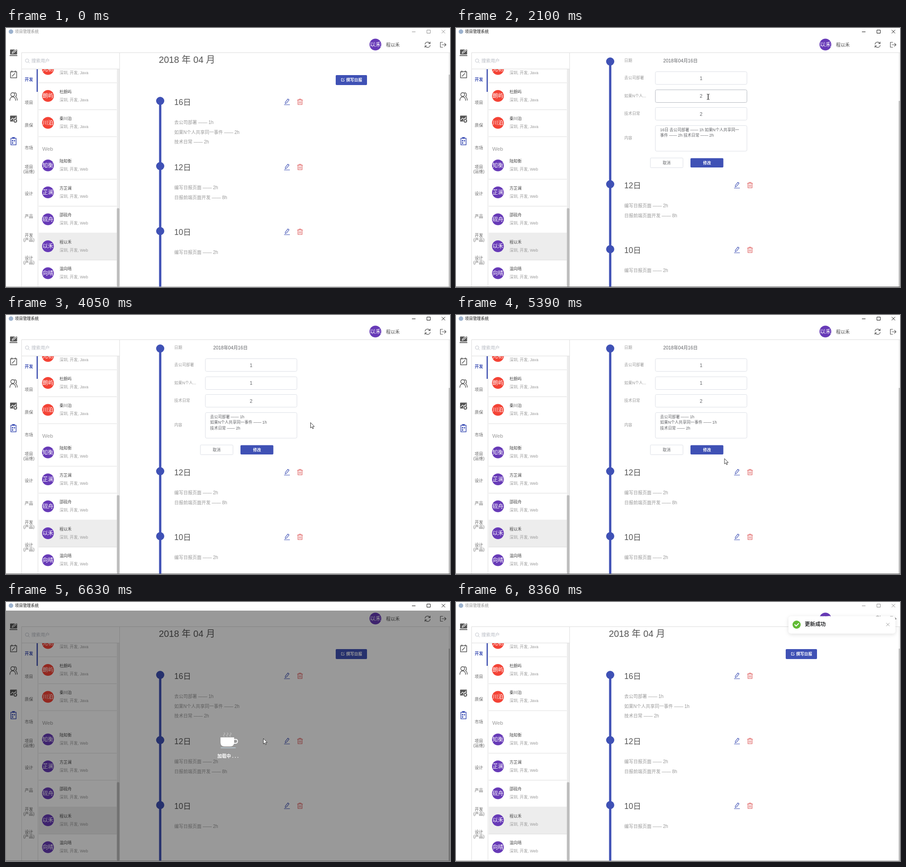
Recreate the animation shown at these times as an HTML page. Size 979 by 572 pixels, loop 8.5 s.

```html
<!DOCTYPE html>
<html lang="zh-CN">
<head>
<meta charset="utf-8">
<title>项目管理系统</title>
<style>
  html, body { margin: 0; width: 100%; height: 100%; overflow: hidden; background: #fff; }
  svg { display: block; width: 979px; height: 572px; }
  text { font-family: "Liberation Sans", Arial, "Noto Sans CJK SC", "Noto Sans CJK", sans-serif; }
  .line { fill: none; stroke-linecap: round; stroke-linejoin: round; }
</style>
</head>
<body>
<svg id="stage" viewBox="0 0 979 572"></svg>
<script>
const LOOP = 8500;
const BLUE = '#3f51b5', RED = '#f44336', PURPLE = '#673ab7';
const DARK = '#555', GREY = '#999', RULE = '#ddd', BORDER = '#dcdfe6', HOVER = '#b4b8c0';

// Markup helpers; text is placed by its vertical centre.
const text = (x, y, s, size = 10, fill = GREY, attrs = '') =>
  `<text x="${x}" y="${(y + size * .37).toFixed(2)}" font-size="${size}" fill="${fill}" ${attrs}>${s}</text>`;
const mid = (x, y, s, size, fill, attrs = '') => text(x, y, s, size, fill, 'text-anchor="middle" ' + attrs);
const rect = (x, y, w, h, fill, attrs = '') =>
  `<rect x="${x}" y="${y}" width="${w}" height="${h}" fill="${fill}" ${attrs}/>`;
const circle = (x, y, r, fill, attrs = '') => `<circle cx="${x}" cy="${y}" r="${r}" fill="${fill}" ${attrs}/>`;
const line = (d, stroke = DARK, width = 1.2, attrs = '') =>
  `<path class="line" d="${d}" stroke="${stroke}" stroke-width="${width}" ${attrs}/>`;
const group = (id, body, attrs = '') => `<g id="${id}" ${attrs}>${body}</g>`;
const avatar = (x, y, s, fill) => circle(x, y, 13, fill) + mid(x, y, s, 12, '#fff');
const bold = 'font-weight="bold"';

function titleBar() {
  return circle(11, 8, 5, '#9db3cf') +
    group('caption', text(20, 8, '项目管理系统', 8.7, 'currentColor') +
      line('M895.5 8.5h7M928.5 4.5h7v7h-7zM961 4.5l7 7m0-7l-7 7', 'currentColor', 1));
}

function header() {
  return avatar(814.5, 36.5, '以禾', PURPLE) + text(838, 37, '程以禾', 10, '#444') +
    line('M924 36a5.7 5.7 0 0 1 10.6-2M935.3 30.8v3.6h-3.6M935.3 38a5.7 5.7 0 0 1-10.6 2M923.8 43v-3.6h3.6') +
    line('M963 31.5h-5.2v11h5.2M961.5 37h8.5M966.8 33.6l3.4 3.4-3.4 3.4');
}

function sideIcons() {
  return rect(9, 47.5, 15.5, 11, DARK, 'rx="1"') + rect(8, 60, 17, 1.8, DARK) +
    line('M13.5 56l1-3 6.5-5.5 1.8 2-6.4 5.5z', '#fff', 1.1) +
    line('M10 96.5h13.500v13.500h-13.500zM13 94.500v3M20.500 94.500v3M13.500 106.500l6-6', DARK, 1.5) +
    line('M10.500 147a4.300 4.300 0 1 0 8.600 0a4.300 4.300 0 1 0-8.600 0M8.500 160c0-5 2.800-8 6.300-8s6.300 3 6.300 8M19 143c4.500 0 5.500 6 2 8.500c2.300 1.500 3.800 4 3.800 8', DARK, 1.4) +
    rect(9, 193.500, 15, 13, DARK, 'rx="1"') + line('M10.500 203l4-4 3 2.500 5-5', '#fff') +
    circle(20.500, 205, 5, '#fff') + circle(20.500, 205, 3, 'none', `stroke="${DARK}" stroke-width="2"`) +
    line('M10.700 243.500h11.600v14.500h-11.600z', BLUE, 1.5) + rect(13.500, 241, 6, 3.500, BLUE) +
    rect(13, 247.500, 3, 3, BLUE) + rect(17.500, 247.500, 2.500, 3, BLUE) + rect(13, 252.500, 3, 3, BLUE);
}

function tabs() {
  const labels = ['开发', '项目', '质保', '市场', '项目 (运维)', '设计', '产品', '开发 (产品)', '设计 (产品)'];
  return labels.map((label, i) => {
    const y = 114 + i * 50.3, [top, bottom] = label.split(' ');
    const fill = i ? '#666' : BLUE;
    return bottom
      ? mid(50.5, y - 8.5, top, 9.2, fill) + mid(50.5, y + 1.5, bottom, 9.2, fill)
      : mid(50.5, y, top, 9.2, fill, i ? '' : bold);
  }).join('') + rect(67.5, 91, 2.5, 50, BLUE);
}

function person(y, name, team, fill) {
  return (name === '程以禾' ? rect(72, y - 29, 172, 59, '#ededed') : '') +
    avatar(92.5, y, name.slice(1), fill) +
    text(118, y - 9.500, name, 8.9, '#444') + text(118, y + 8.500, '深圳, 开发, ' + team, 8.8) +
    rect(72, y + 30, 172, 1, RULE);
}

function people() {
  const java = ['沈允初', '杜朗屿', '秦川泊'], web = ['陆知衡', '方芷澜', '邵砚舟', '程以禾', '温向晴'];
  return java.map((n, i) => person(90.5 + i * 59.500, n, 'Java', RED)).join('') +
    text(80, 267, 'Web', 11.7) +
    web.map((n, i) => person(303.5 + i * 59.500, n, 'Web', PURPLE)).join('');
}

function frame() {
  return rect(34, 54, 945, 1, RULE) + rect(34, 54, 1, 517, RULE) + rect(250, 54, 1, 517, RULE) +
    rect(35, 90, 215, 1, RULE) + rect(70, 91, 1, 480, RULE) +
    circle(46.500, 72, 3.8, 'none', 'stroke="#c0c4cc"') + line('M49.500 75l2.500 2.500', '#c0c4cc', 1) +
    text(56, 72.500, '搜索用户', 10.1, '#b8bcc4');
}

const tools = y =>
  line(`M615.500 ${y + 4}l.6-3.300 5.500-7 2.600 2-5.500 7zM613.500 ${y + 6.500}h12`, BLUE, 1.1) +
  line(`M642.500 ${y - 4}h11.500M646 ${y - 4}v-2h4.500v2M643.800 ${y - 4}v10h9v-10M646.800 ${y - 1}v4.500M649.800 ${y - 1}v4.500`, '#dc5050', 1.1);

const node = y => circle(340, y, 9, BLUE);

function day(y, label, rows) {
  return text(371, y + 3, label, 17.5, DARK) + tools(y + 2) +
    rows.map((r, i) => text(371, y + 47.500 + i * 21.500, r, 10)).join('');
}

const field = (id, y, h) => rect(439.5, y, 202, h, '#fff', `id="${id}" rx="3" stroke="${BORDER}"`);
const lines = (id, rows) => group(id, rows.map((r, i) => text(450, 225 + i * 12.2, r, 8.7, '#606266')).join(''));

function form() {
  const labels = [['日期', 72], ['去公司部署', 110], ['如果N个人...', 149.500], ['技术日常', 189], ['内容', 243]];
  return labels.map(([s, y]) => text(371, y, s, 8.7)).join('') +
    text(457, 72.500, '2018年04月16日', 10.2, '#606266') +
    field('hours1', 96.500, 28) + field('hours2', 136.500, 28) + field('hours3', 175.500, 28) + field('content', 215.500, 56.500) +
    rect(439.5, 136.500, 202, 28, 'none', `id="focus" rx="3" stroke="${BLUE}"`) +
    mid(540.5, 111, '1', 10.5, '#606266') +
    mid(540.5, 150.500, '2', 10.5, '#606266', 'id="digit"') +
    mid(540.5, 190, '2', 10.5, '#606266') +
    rect(544, 145, .8, 11, '#444', 'id="caret"') +
    lines('oldContent', ['16日 去公司部署 —— 1h 如果N个人共享同一', '事件 —— 2h 技术日常 —— 2h']) +
    lines('newContent', ['去公司部署 —— 1h', '如果N个人共享同一事件 —— 1h', '技术日常 —— 2h']) +
    rect(428.500, 287, 72, 21.500, '#fff', `rx="2" stroke="${BORDER}"`) + mid(464.500, 297.500, '取消', 8.7, '#606266') +
    rect(517, 287.500, 72.500, 20.500, BLUE, 'rx="2"') + mid(553.500, 297.500, '修改', 8.7, '#fff', bold);
}

function timeline() {
  return text(337, 70, '2018 年 04 月', 20.1, DARK) +
    rect(727, 104, 69, 22, BLUE, 'rx="2"') +
    line('M742.500 111.500h-3v6h6v-3M742 115l4-4', '#fff', 1) + text(750, 115, '撰写日报', 8.8, '#fff', bold) +
    rect(337.500, 161, 5, 900, BLUE) + node(161) +
    group('today', day(161, '16日', ['去公司部署 —— 1h', '如果N个人共享同一事件 —— <tspan id="shared">2h</tspan>', '技术日常 —— 2h'])) +
    group('form', form(), 'transform="translate(0 87)"') +
    group('earlier', node(305) + node(448.500) +
      day(305, '12日', ['编写日报页面 —— 2h', '日报前端页面开发 —— 8h']) +
      day(448, '10日', ['编写日报页面 —— 2h']));
}

function loading() {
  return rect(0, 19, 979, 552, '#000', 'opacity=".4"') +
    line('M481 297q-3-2 0-4t0-4M488 297q-3-2 0-4t0-4M495 297q-3-2 0-4t0-4', '#ccc', 1.6, 'opacity=".6"') +
    '<path d="M473 299h30v11q0 9-9 9h-12q-9 0-9-9z" fill="#fff"/>' +
    line('M503 303.500h4q3.500 0 3.500 4t-4 4.500h-4', '#fff', 1.8) + rect(473.500, 321, 33, 2, '#b4c2ca') +
    text(466, 340.500, '加载中 . . .', 10, '#fff', bold);
}

function toast() {
  return rect(733, 31.500, 236, 38, '#fff', 'rx="6" filter="url(#shadow)"') +
    circle(751, 50, 9, '#62bb35') + line('M747 50l3 3 5.500-5.500', '#fff', 1.9) +
    text(769, 48.500, '更新成功', 11.6, '#303133', bold) +
    line('M949 46.500l6.500 6.500m0-6.500l-6.500 6.500', GREY, 1);
}

const stage = document.getElementById('stage');
stage.innerHTML = `<defs>
    <clipPath id="mainClip">${rect(251, 55, 728, 516, '#000')}</clipPath>
    <clipPath id="listClip">${rect(71, 91, 179, 480, '#000')}</clipPath>
    <filter id="shadow" x="-20%" y="-60%" width="140%" height="220%">
      <feDropShadow dx="0" dy="2" stdDeviation="4.5" flood-opacity=".13"/></filter>
  </defs>` +
  rect(0, 0, 979, 572, '#fff') + titleBar() + header() + sideIcons() +
  `<g clip-path="url(#listClip)">${people()}${rect(244.500, 91, 5.500, 480, '#ececec')}${rect(244.500, 398, 5.500, 173, '#bdbdbd', 'rx="2"')}</g>` +
  frame() + tabs() +
  `<g clip-path="url(#mainClip)">${group('page', timeline())}${rect(976, 55, 3, 516, '#f1f1f1')}${rect(976, 103, 3, 520, '#c1c1c1', 'id="thumb"')}</g>` +
  group('loading', loading()) + group('toast', toast()) +
  rect(0, 571, 979, 1, '#777', 'id="edge"') +
  group('pointer',
    group('arrow', '<path d="M.5.5v12l2.800-2.500 1.800 4.200 1.900-.8-1.800-4.100h3.700z" fill="#fff" stroke="#222" stroke-width=".9"/>') +
    group('hand', '<path d="M-1.200 1q1.200-1.500 2.400 0v5l6 1.200q1.300.5 1.100 2l-1 5.300h-6.800l-4.500-5.500q0-1.800 2.800 0z" fill="#fff" stroke="#222" stroke-width=".9"/>') +
    group('ibeam', line('M-2.500-6q2.500 0 2.500 1v10q0 1-2.500 1M2.500-6q-2.500 0-2.500 1v10q0 1 2.500 1', '#222', 1)));

const el = {};
stage.querySelectorAll('[id]').forEach(e => el[e.id] = e);

const clamp = v => Math.min(1, Math.max(0, v));
const ramp = (t, from, to) => clamp((t - from) / (to - from));
const smooth = v => v * v * (3 - 2 * v);
const easeOut = v => 1 - (1 - v) ** 3;
const show = (e, on) => e.setAttribute('display', on ? 'inline' : 'none');
const move = (e, x, y) => e.setAttribute('transform', `translate(${x.toFixed(2)} ${y.toFixed(2)})`);

// Pointer stops: time, x, y
const PATH = [
  [70, 909, 561], [850, 615, 157], [1220, 615, 157], [1700, 556, 152], [3120, 556, 152],
  [3500, 704, 195], [3830, 704, 195], [4050, 671, 237], [4270, 632, 250], [4670, 716, 363],
  [4750, 716, 363], [4900, 743, 367], [5210, 743, 367], [5500, 521, 293], [5690, 567, 301],
  [7240, 567, 301], [8040, 927, 573]
];

function pointerAt(t) {
  const i = PATH.findIndex(p => p[0] > t);
  if (i < 1) return PATH[i < 0 ? PATH.length - 1 : 0].slice(1);
  const [t0, x0, y0] = PATH[i - 1], [t1, x1, y1] = PATH[i];
  const k = smooth(ramp(t, t0, t1));
  return [x0 + (x1 - x0) * k, y0 + (y1 - y0) * k];
}

const FIELDS = [['hours1', 96, 125], ['hours2', 136, 165], ['hours3', 175, 204], ['content', 215, 272]];

function render(t) {
  const active = t >= 990 && t < 8360;
  const editing = t >= 1080 && t < 6550;
  const busy = t >= 6460 && t < 6550 || t >= 6630 && t < 6700;
  const scroll = editing ? 87 * easeOut(ramp(t, 1700, 1900)) : 0;
  const saved = t >= 3520;

  el.caption.setAttribute('color', active ? '#111' : '#8c8c8c');
  el.edge.setAttribute('fill', active ? '#666' : '#aaa');
  move(el.page, 0, -scroll);
  move(el.earlier, 0, editing ? 127 : 0);
  el.thumb.setAttribute('y', 103 + scroll * 58 / 87);
  show(el.today, !editing);
  show(el.form, editing);
  el.shared.textContent = t >= 6700 ? '1h' : '2h';

  el.digit.textContent = t < 2790 ? '2' : t < 3020 ? '' : '1';
  el.focus.setAttribute('opacity', ramp(t, 2330, 2560) - ramp(t, 3520, 3680));
  show(el.caret, t >= 2330 && !saved);
  show(el.oldContent, !saved);
  show(el.newContent, saved);

  show(el.loading, busy);
  show(el.toast, t >= 6700);
  move(el.toast, 236 * (1 - smooth(ramp(t, 6700, 7050))), 0);

  const [x, y] = pointerAt(t);
  const live = editing && t >= 1900 && !busy;
  const hovered = live && x > 439 && x < 642 ? FIELDS.find(f => y > f[1] && y < f[2]) : null;
  FIELDS.forEach(f => el[f[0]].setAttribute('stroke', f === hovered ? HOVER : BORDER));
  const onButton = live && x > 517 && x < 589 && y > 287 && y < 308;
  const onPencil = t < 1080 && x < 626 && y < 172;
  const kind = hovered ? 'ibeam' : onButton || onPencil ? 'hand' : 'arrow';
  ['arrow', 'hand', 'ibeam'].forEach(k => show(el[k], k === kind));
  show(el.pointer, t >= 70 && t < 8040);
  move(el.pointer, x, y);
}

const start = performance.now();
function tick() {
  render((performance.now() - start) % LOOP);
  requestAnimationFrame(tick);
}
tick();
</script>
</body>
</html>
```
